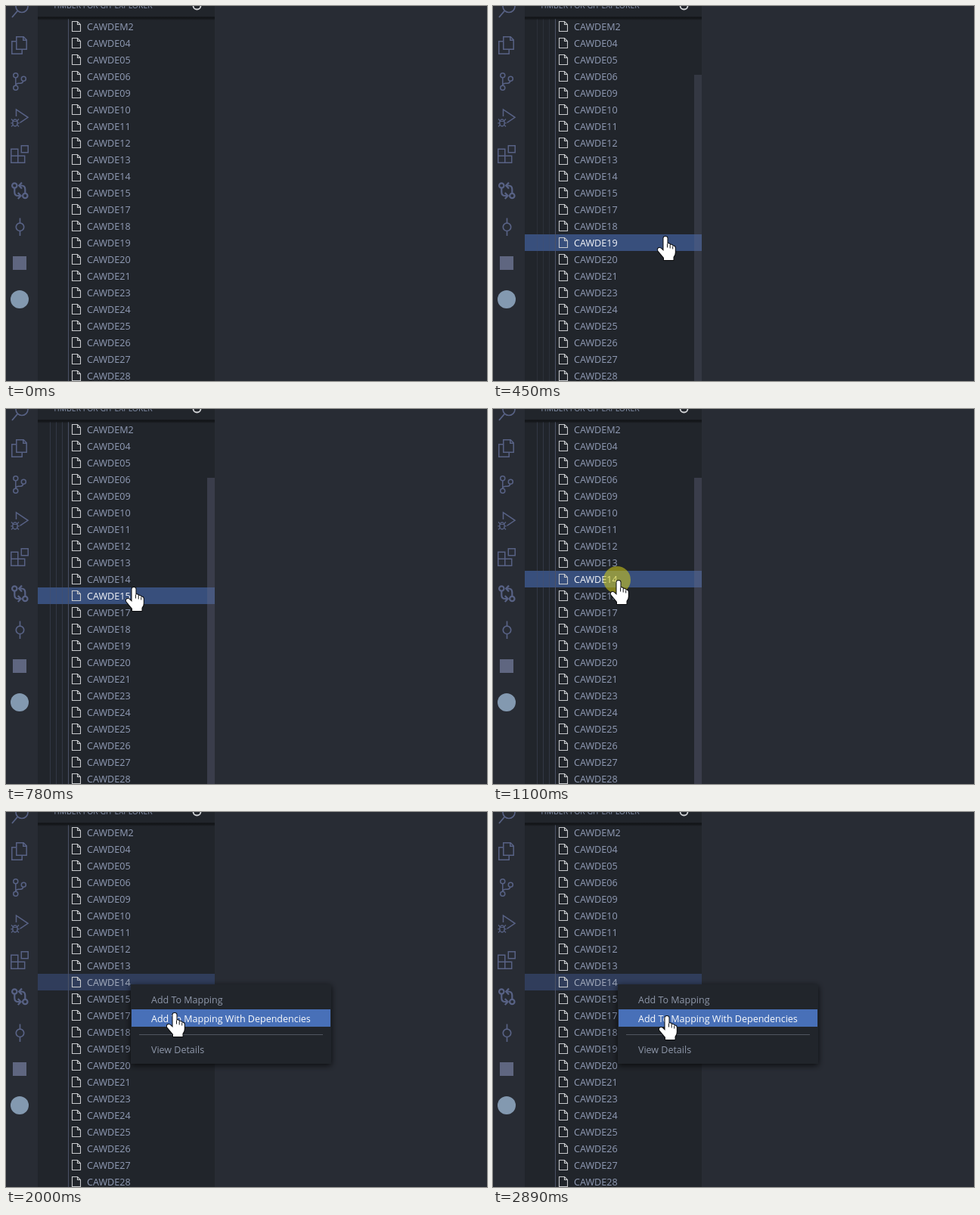
Write an HTML page with a canvas that moves like this. It is 636 px wide and 496 px high and loops after 2960 ms.

```html
<!DOCTYPE html>
<html lang="en">
<head>
<meta charset="utf-8">
<title>Explorer context menu</title>
<style>
html, body { margin: 0; width: 100%; height: 100%; overflow: hidden; background: #282c34; }
canvas { display: block; }
</style>
</head>
<body>
<canvas id="stage" width="636" height="496"></canvas>
<script>
const ctx = document.getElementById('stage').getContext('2d');
const LOOP = 2960;
const FONT = '"Open Sans", "Noto Sans", sans-serif';
const ICON = '#586285';
const ROW_H = 22, ROW_TOP = 16, CLICKED = 9;
const files = 'M2 04 05 06 09 10 11 12 13 14 15 17 18 19 20 21 23 24 25 26 27 28'
  .split(' ').map(n => 'CAWDE' + n);

// Moments at which the screen updates.
const ticks = [0, 140, 200, 260, 330, 400, 450, 520, 590, 640, 710, 770, 830, 900,
  1100, 1220, 1280, 1340, 1410, 1810, 1880, 1940, 2000, 2050, 2140, 2230, 2320,
  2370, 2440, 2500, 2570, 2630, 2700, 2760, 2820, 2890];

// Pointer path: time, x, y.
const path = [
  [140, 405, 465], [330, 271, 346], [590, 178, 258], [640, 173, 249],
  [830, 167, 230], [900, 166, 227], [1750, 166, 227], [2000, 223, 266],
  [2320, 223, 269], [2600, 228, 280], [2760, 232, 276], [2890, 230, 270]
];

const ramp = (t, a, b) => Math.min(1, Math.max(0, (t - a) / (b - a)));

function pointerAt(t) {
  if (t < path[0][0]) return null;
  for (let i = 1; i < path.length; i++) {
    const [t0, x0, y0] = path[i - 1], [t1, x1, y1] = path[i];
    if (t <= t1) {
      const k = ramp(t, t0, t1);
      return { x: Math.round(x0 + (x1 - x0) * k), y: Math.round(y0 + (y1 - y0) * k) };
    }
  }
  const [, x, y] = path[path.length - 1];
  return { x, y };
}

function rect(x, y, w, h, color) {
  ctx.fillStyle = color;
  ctx.fillRect(x, y, w, h);
}

function text(s, x, y, size, color) {
  ctx.font = size + 'px ' + FONT;
  ctx.fillStyle = color;
  ctx.fillText(s, x, y);
}

function stroke(d, color, width) {
  ctx.strokeStyle = color;
  ctx.lineWidth = width;
  ctx.stroke(new Path2D(d));
}

function ring(x, y, r, color, width) {
  ctx.beginPath();
  ctx.arc(x, y, r, 0, Math.PI * 2);
  ctx.strokeStyle = color;
  ctx.lineWidth = width;
  ctx.stroke();
}

function disc(x, y, r, color) {
  ctx.beginPath();
  ctx.arc(x, y, r, 0, Math.PI * 2);
  ctx.fillStyle = color;
  ctx.fill();
}

function activityBar() {
  // search
  ring(21, 0.5, 8, ICON, 1.6);
  stroke('M15.2 6.5L8 15', ICON, 1.8);
  // files
  stroke('M13.8 40.8H23.2L27.2 44.8V57.2H13.8ZM22.8 40.8V45.2H27.2', ICON, 1.5);
  stroke('M13.5 46.8H7.8V63.2H21.2V57.5', ICON, 1.5);
  // source control
  ring(12.8, 91.7, 3, ICON, 1.5);
  ring(12.8, 108.2, 3, ICON, 1.5);
  ring(23.3, 96.2, 3, ICON, 1.5);
  stroke('M12.8 94.7V105.2M22.9 99.2Q22 102.2 19 102.2H16.5Q13.5 102.2 12.8 105.2', ICON, 1.5);
  // run and debug
  stroke('M13.5 146V137L29 147.3L18.5 154.3', ICON, 1.5);
  ctx.beginPath();
  ctx.ellipse(12, 154.5, 3.2, 4.4, 0, 0, Math.PI * 2);
  ctx.stroke();
  stroke('M9 152.5H15M6.3 154.8H8.8M15.2 154.8H17.7M7 149.5L9.5 152M17 149.5L14.5 152M7 159.5L9.5 157M17 159.5L14.5 157', ICON, 1.2);
  // extensions
  stroke('M20.3 184.8H29.2V193.7H20.3Z', ICON, 1.5);
  stroke('M6.8 189.3H15.8V198.3H24.7V207.2H6.8ZM6.8 198.3H15.8V207.2', ICON, 1.5);
  // compare
  ring(11.3, 237.5, 3.2, ICON, 2.2);
  ring(25.3, 251, 3.2, ICON, 2.2);
  stroke('M11.3 241V246Q11.3 251 16 251H18M25.3 247.5V242.5Q25.3 237.5 20.5 237.5H18.5', ICON, 2.2);
  stroke('M15.8 247L19.6 251L15.8 255M21 233.5L17.2 237.5L21 241.5', ICON, 2.2);
  // commit
  ring(18.5, 292.3, 5.2, ICON, 1.7);
  stroke('M18.5 280.5V287M18.5 297.5V304', ICON, 1.7);
  // plain marks
  rect(9, 331, 18, 18, '#5f6680');
  disc(18, 388, 12, '#8399b0');
}

function fileIcon(x, y) {
  stroke(`M${x + .5} ${y + .5}H${x + 7.5}L${x + 11.5} ${y + 4.5}V${y + 13.5}H${x + .5}Z` +
    `M${x + 7.5} ${y + .5}V${y + 4.5}H${x + 11.5}`, '#c8cacd', 1.1);
}

function sidebar(t, hover, menuOpen) {
  rect(42, 0, 234, 496, '#21252b');
  if (menuOpen) rect(42, ROW_TOP + CLICKED * ROW_H, 234, ROW_H, '#303d5b');
  else if (hover >= 0) rect(42, ROW_TOP + hover * ROW_H, 234, ROW_H, '#384f7c');

  const guides = ramp(t, 380, 500) * (1 - ramp(t, 1220, 1400));
  for (const x of [58, 66, 74]) rect(x, 17, 1, 479, `rgba(75,82,102,${0.42 * guides})`);
  rect(82, 17, 1, 479, '#4b5266');

  files.forEach((name, i) => {
    const y = ROW_TOP + i * ROW_H;
    const color = !menuOpen && i === hover ? '#f4f6fa'
      : menuOpen && i === CLICKED ? '#a4adbf' : '#919cb6';
    fileIcon(87, y + 4);
    text(name, 107, y + 16, 12.6, color);
  });

  const bar = ramp(t, 360, 480) * (1 - ramp(t, 1780, 1990));
  rect(266, 91, 10, 405, `rgba(100,105,130,${0.37 * bar})`);

  // panel title and its scroll shadow
  rect(42, 0, 234, 15, '#21252b');
  const shade = ctx.createLinearGradient(0, 14, 0, 19);
  shade.addColorStop(0, 'rgba(0,0,0,.3)');
  shade.addColorStop(0.4, 'rgba(0,0,0,.45)');
  shade.addColorStop(1, 'rgba(0,0,0,0)');
  rect(42, 14, 234, 5, shade);
  text('TIMBER FOR GIT EXPLORER', 62, 3, 10.45, '#8490aa');
  ring(252.5, -0.5, 5, '#d3d5d8', 1.8);
}

function contextMenu(p) {
  ctx.save();
  ctx.shadowColor = 'rgba(0,0,0,.75)';
  ctx.shadowBlur = 8;
  ctx.shadowOffsetY = 2;
  rect(165, 228, 265, 105, '#21252b');
  ctx.restore();
  const items = [
    ['Add To Mapping', 236], ['Add To Mapping With Dependencies', 261], ['View Details', 302]
  ];
  for (const [label, y] of items) {
    const active = p.x > 166 && p.y >= y && p.y < y + 24;
    if (active) rect(166, y, 263, 23, '#4870b8');
    text(label, 192, y + 17, 12.5, active ? '#fafbfd' : '#8f98aa');
  }
  rect(176, 294, 243, 1, '#50555f');
}

const arrow = new Path2D('M0 0V22.5L5 18L9 26L12.5 24.5L9.2 17H16Z');
const hand = new Path2D('M-2.5 2Q-2.5 0 0 0Q2.5 0 2.5 2V9.5Q5.6 8.6 6.2 11Q9 10.2 9.7 12.6' +
  'Q12.8 12 12.8 15V21Q12.8 24.5 10.5 27V31H-2V28L-9.5 19Q-11 16.5 -9 15.2Q-7 14.5 -5 16.5L-2.5 19Z');
const knuckles = 'M2.5 9.5V14.5M6.2 11V15.5M9.7 12.8V16.5';

function pointer(p) {
  const overRows = p.x < 266;
  const shape = overRows ? hand : arrow;
  ctx.save();
  ctx.translate(p.x, p.y);
  ctx.lineJoin = 'round';
  ctx.strokeStyle = '#0b0c0e';
  ctx.lineWidth = 2;
  ctx.stroke(shape);
  ctx.fillStyle = '#fff';
  ctx.fill(shape);
  if (overRows) stroke(knuckles, '#15171a', 1);
  ctx.restore();
}

function draw(time) {
  let n = 0;
  while (n + 1 < ticks.length && ticks[n + 1] <= time) n++;
  const t = ticks[n];
  const p = pointerAt(t);
  // Row highlight trails the pointer by one update.
  const last = n > 0 ? pointerAt(ticks[n - 1]) : null;
  const hover = last && last.x < 266 ? Math.floor((last.y - ROW_TOP) / ROW_H) : -1;
  const menuOpen = t >= 1340;

  rect(0, 0, 636, 496, '#282c34');
  activityBar();
  sidebar(t, hover, menuOpen);
  if (menuOpen) contextMenu(p);
  if (t >= 1100 && t < 1280) {
    disc(164, 226, 18, `rgba(215,207,25,${t < 1220 ? 0.55 : 0.28})`);
  }
  if (p) pointer(p);
}

const start = performance.now();
function loop() {
  draw((performance.now() - start) % LOOP);
  requestAnimationFrame(loop);
}
loop();
</script>
</body>
</html>
```
